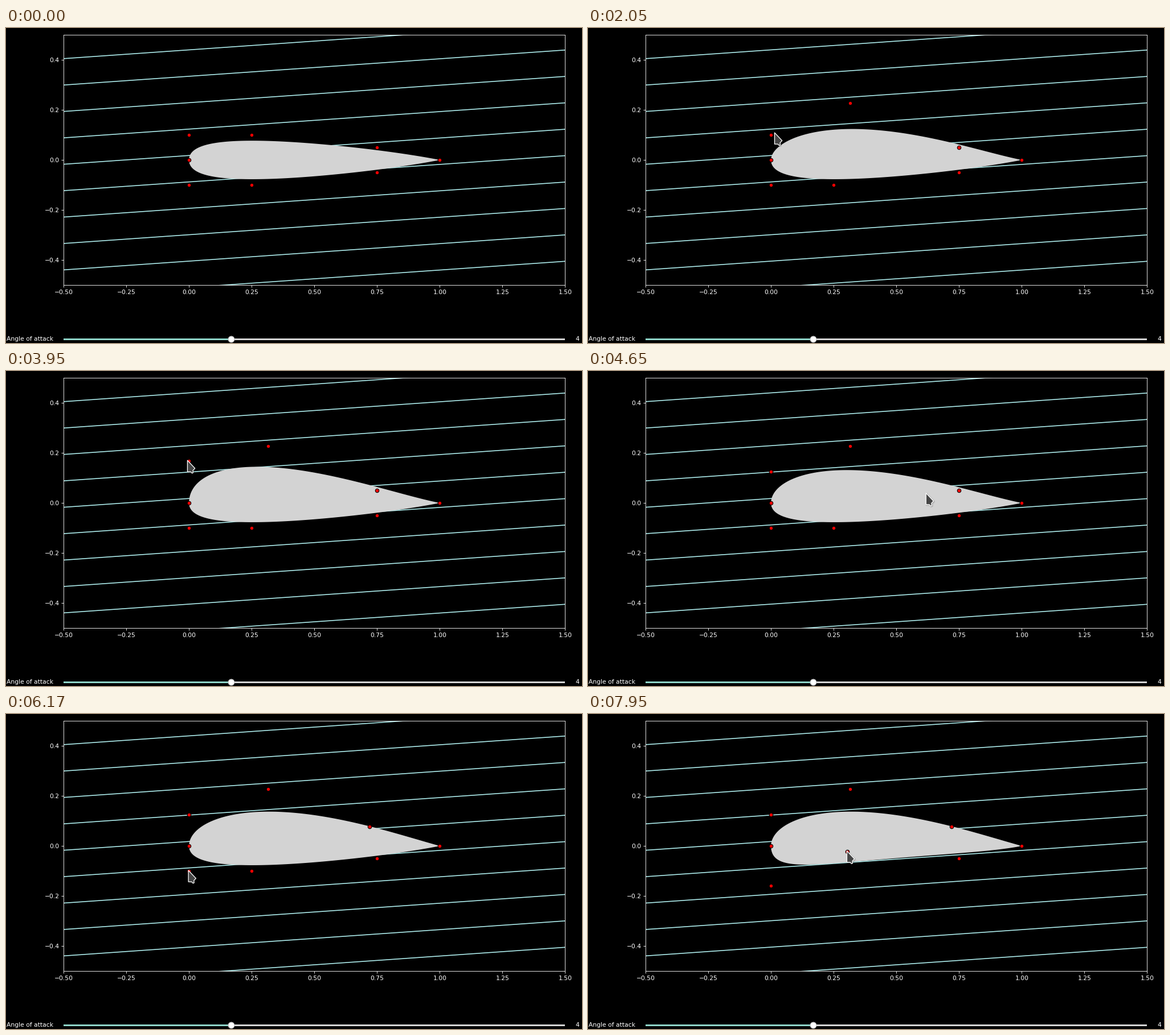
Write a matplotlib script that moves like this. It is 1011 by 554 pixels and loops after 8000 ms.

```python
import numpy as np
import matplotlib.pyplot as plt
from matplotlib.animation import FuncAnimation
from matplotlib.patches import Polygon, Rectangle

W, H, DPI = 1011, 554, 64
STEP, LOOP = 40, 8000
U = 1.08 * 72 / DPI                     # user interface scale, in points
LEFT, TOP, UNIT = 101.1, 12.0, 440.15   # plot corner and pixels per unit

plt.rcParams.update({
    "font.family": "DejaVu Sans", "font.size": 10 * U,
    "text.color": "white", "axes.edgecolor": "white",
    "axes.linewidth": 0.8 * U,
})
for axis in ("xtick", "ytick"):
    plt.rcParams.update({f"{axis}.color": "white",
                         f"{axis}.major.size": 3.5 * U,
                         f"{axis}.major.width": 0.8 * U,
                         f"{axis}.major.pad": 3.5 * U})

fig = plt.figure(figsize=(W / DPI, H / DPI), dpi=DPI, facecolor="black")

# Flow plot
ax = fig.add_axes([LEFT / W, 1 - (TOP + UNIT) / H, 2 * UNIT / W, UNIT / H],
                  facecolor="black")
ax.set_xlim(-0.5, 1.5)
ax.set_ylim(-0.5, 0.5)
ax.set_xticks(np.linspace(-0.5, 1.5, 9))
ax.set_yticks(np.linspace(-0.4, 0.4, 5))
ax.xaxis.set_major_formatter("{x:.2f}")
ax.yaxis.set_major_formatter("{x:.1f}")

alpha = np.radians(4)
xs = np.array([-0.5, 1.5])
for seed in np.linspace(-1, 1, 20):
    ax.plot(xs, seed / np.cos(alpha) + np.tan(alpha) * (xs - 0.5),
            color="paleturquoise", lw=1.5 * U, zorder=1)

foil = Polygon([(0, 0), (1, 0)], fc="lightgray", ec="none", zorder=2)
ax.add_patch(foil)
dots, = ax.plot([], [], "o", ms=6 * U, mfc="red", mec="black", mew=U, zorder=3)

# Overlay in stage pixels: slider and pointer
stage = fig.add_axes([0, 0, 1, 1], zorder=5)
stage.set_xlim(0, W)
stage.set_ylim(H, 0)
stage.axis("off")

track = 2 * UNIT
for length, color in ((track, "lightgray"), (track / 3, "#8dd3c7")):
    stage.add_patch(Rectangle((LEFT, 546), length, 3, fc=color, ec="none"))
stage.plot(LEFT + track / 3, 547.4, "o", ms=10 * U, mfc="white", mec="0.75", mew=U)
stage.text(LEFT - 0.02 * track, 547.5, "Angle of attack", ha="right", va="center")
stage.text(LEFT + 1.02 * track, 547.5, "4", ha="left", va="center")

ARROW = np.array([(0, 0), (0, 20), (6, 20.2), (8, 22.6), (10, 21.8),
                  (9.6, 17.8), (13.2, 14)])
shadow = Polygon(ARROW, fc="black", ec="black", lw=3 * U, alpha=0.12,
                 joinstyle="round", zorder=8)
pointer = Polygon(ARROW, fc="#464646", ec="white", lw=1.2 * U,
                  joinstyle="round", zorder=9)
stage.add_patch(shadow)
stage.add_patch(pointer)

# Bezier handles: nose, three on each side, tail
HANDLES = {"nose": (0, 0), "top1": (0, 0.1), "top2": (0.25, 0.1),
           "top3": (0.75, 0.05), "tail": (1, 0), "low1": (0, -0.1),
           "low2": (0.25, -0.1), "low3": (0.75, -0.05)}
UPPER = ("nose", "top1", "top2", "top3", "tail")
LOWER = ("nose", "low1", "low2", "low3", "tail")
ENTRY = (0.07, -0.44)

# Pointer legs: start, end, handle, drag goal (None: just go there), bulge
LEGS = [
    (300, 1000, "top2", None, (0.07, 0.24)),
    (1340, 1750, "top2", (0.315, 0.2275), (0.05, -0.015)),
    (1800, 2200, "top1", None, (0, 0)),
    (2410, 2760, "top1", (-0.02, 0.178), (0, 0)),
    (3120, 3660, "top1", None, (0.035, -0.13)),
    (3850, 4250, "top1", (-0.008, 0.126), (0, 0.026)),
    (4410, 5000, "top3", None, (0.03, -0.03)),
    (5190, 5700, "top3", (0.72, 0.078), (0.026, -0.015)),
    (5700, 6060, "low1", None, (0, 0)),
    (6250, 6790, "low1", (0, -0.1), (0, 0.086)),
    (6800, 6960, "low1", (-0.008, -0.158), (0, 0)),
    (7160, 7360, "low2", None, (0, 0)),
    (7570, 7930, "low2", (0.305, -0.022), (0, 0)),
]

s = np.linspace(0, 1, 200)
BASIS = np.stack([c * s**k * (1 - s)**(4 - k)
                  for k, c in enumerate((1, 4, 6, 4, 1))], axis=1)


def pose(t):
    """Handle positions and pointer position at time t, in plot units."""
    pts = {name: np.array(p, float) for name, p in HANDLES.items()}
    tip = np.array(ENTRY)
    for start, end, name, goal, bulge in LEGS:
        if t < start:
            break
        u = min((t - start) / (end - start), 1)
        to = pts[name] if goal is None else np.array(goal)
        tip = tip + (to - tip) * (1 - (1 - u)**3) + np.sin(np.pi * u) * np.array(bulge)
        if goal is not None:
            # handles at the nose only slide up and down
            pts[name] = np.array([0 if name.endswith("1") else tip[0], tip[1]])
    return pts, tip


def draw(i):
    t = i * STEP + 10
    pts, tip = pose(t)
    top, low = (BASIS @ np.array([pts[n] for n in side]) for side in (UPPER, LOWER))
    foil.set_xy(np.vstack([top, low[::-1]]))
    dots.set_data(*np.array(list(pts.values())).T)

    corner = np.array([LEFT + (tip[0] + 0.5) * UNIT - 1,
                       TOP + (0.5 - tip[1]) * UNIT - 1])
    pointer.set_xy(ARROW + corner)
    shadow.set_xy(ARROW + corner + 1)
    for part in (pointer, shadow):
        part.set_visible(t >= LEGS[0][0])
    return foil, dots, shadow, pointer


anim = FuncAnimation(fig, draw, frames=LOOP // STEP, interval=STEP,
                     init_func=lambda: draw(0), repeat=True, repeat_delay=0)
plt.show()
```
